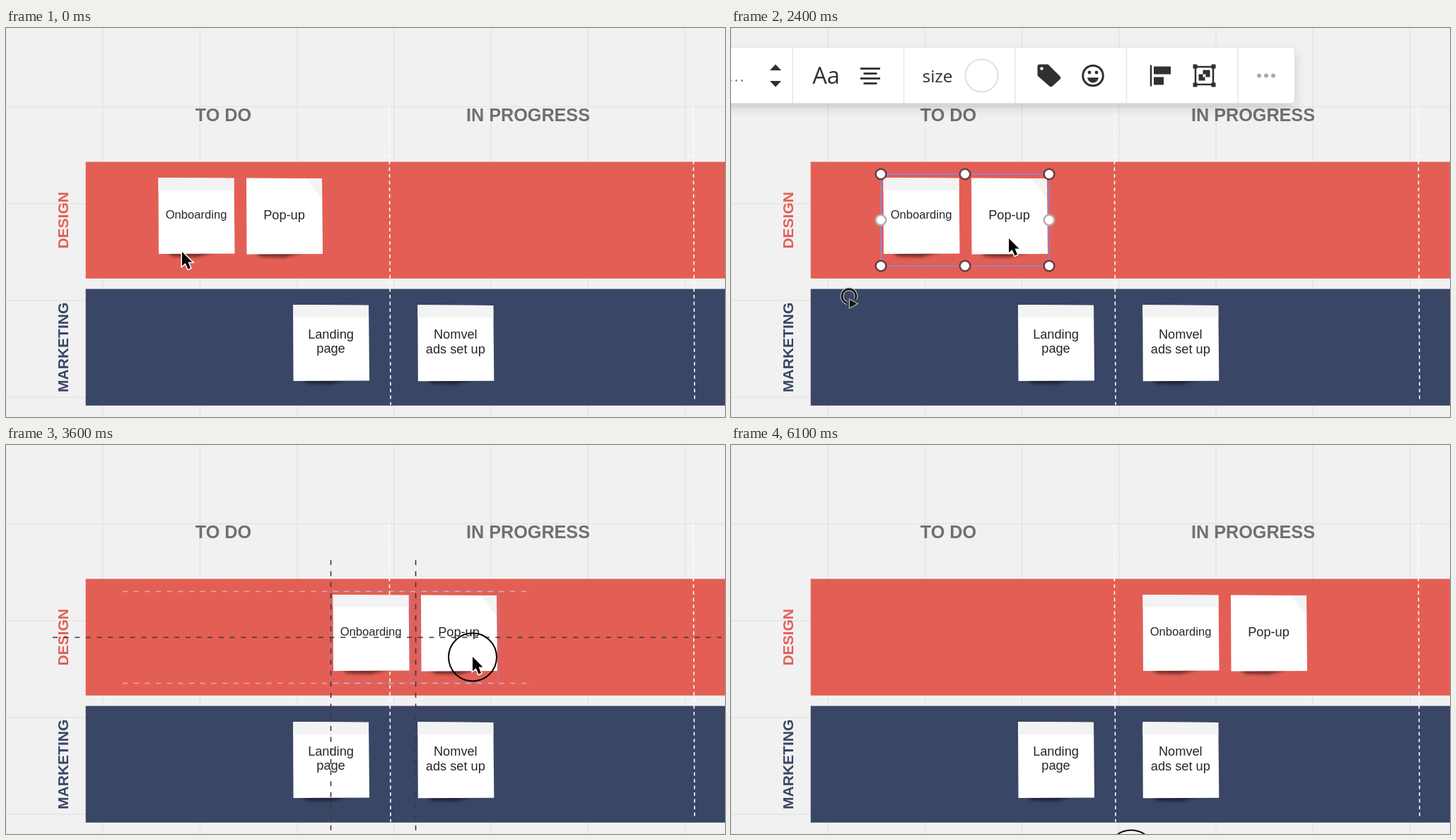
An HTML page with a canvas for the animation above (6200 ms loop, 1017 by 551 pixels).

```html
<!DOCTYPE html>
<html lang="en">
<head>
<meta charset="utf-8">
<title>Task board</title>
<style>
html, body { margin: 0; width: 100%; height: 100%; overflow: hidden; background: #f1f1f1; }
canvas { display: block; }
</style>
</head>
<body>
<canvas id="stage" width="1017" height="551"></canvas>
<script>
const c = document.getElementById('stage').getContext('2d');
const LOOP = 6200, STEP = 100;
const ARIAL = '"Liberation Sans", Arial, sans-serif';
const UI = '"Open Sans", "Noto Sans", sans-serif';
const INK = '#303030', RED = '#e35f55', NAVY = '#3a4665';
const GUIDE_DASH = [7, 8.66];

// Pointer: starting point, then moves as start time, end time, x, y
const START = [249, 317];
const MOVES = [
  [0, 300, 249, 298], [800, 1500, 393, 298], [2900, 3600, 660, 300], [3600, 4000, 766, 300],
  [4400, 5000, 766, 362], [5200, 5900, 566, 579]
];
const PRESSES = [[300, 700], [1500, 1900], [2700, 4300], [6100, LOOP]];
const SINGLE = [700, 1900], DRAG = [2900, 4300], DESELECT = 5200;
const GRAB = 393, DROP = 367, SNAP = 8, LAG = 60;
const BOX = { left: 212, mid: 331, right: 450, top: 207, bottom: 337, card: 113 };
const EDGES = [BOX.left, BOX.mid, BOX.right];
// Alignment guides: x, top, bottom
const GUIDES = [[541, 64, 551], [459, 163, 546], [579, 163, 546]];

const within = (t, [a, b]) => t >= a && t < b;

function pointer(t) {
  return MOVES.reduce(([x, y], [t0, t1, toX, toY]) => {
    const k = Math.min(1, Math.max(0, (t - t0) / (t1 - t0)));
    return [x + (toX - x) * k, y + (toY - y) * k];
  }, START);
}

// The cards trail the pointer a little and snap to guides
function dragShift(t) {
  if (t < DRAG[0]) return 0;
  if (t >= DRAG[1]) return DROP;
  const raw = pointer(t - LAG)[0] - GRAB;
  for (const [x] of GUIDES)
    for (const edge of EDGES)
      if (Math.abs(x - edge - raw) <= SNAP) return x - edge;
  return raw;
}

function line(x0, y0, x1, y1, color, width = 1.5, dash = []) {
  c.strokeStyle = color;
  c.lineWidth = width;
  c.setLineDash(dash);
  c.beginPath();
  c.moveTo(x0, y0);
  c.lineTo(x1, y1);
  c.stroke();
  c.setLineDash([]);
}

function disc(x, y, r, fill, stroke, width = 2) {
  c.beginPath();
  c.arc(x, y, r, 0, 7);
  if (fill) { c.fillStyle = fill; c.fill(); }
  if (stroke) { c.strokeStyle = stroke; c.lineWidth = width; c.stroke(); }
}

function poly(points, fill) {
  c.fillStyle = fill;
  c.beginPath();
  points.forEach(([x, y]) => c.lineTo(x, y));
  c.fill();
}

function rect(x, y, w, h, fill) {
  c.fillStyle = fill;
  c.fillRect(x, y, w, h);
}

function frame(x, y, w, h, color, width) {
  c.strokeStyle = color;
  c.lineWidth = width;
  c.strokeRect(x, y, w, h);
}

function text(s, x, y, font, color) {
  c.font = font;
  c.fillStyle = color;
  c.textAlign = 'center';
  c.fillText(s, x, y);
}

// Runs paint with the origin moved to x, y
function at(x, y, paint) {
  c.save();
  c.translate(x, y);
  paint();
  c.restore();
}

function lane(name, y, color) {
  rect(112.7, y, 905, 165.2, color);
  at(88, y + 82.7, () => {
    c.rotate(-Math.PI / 2);
    text(name, 0, 0, 'bold 21px ' + ARIAL, color);
  });
}

function board() {
  rect(0, 0, 1017, 551, '#f1f1f1');
  for (let i = 0; i < 8; i++) {
    const p = i * 137.2;
    line(p, 0, p, 551, '#e4e4e4');
    line(0, 111.5 + p, 1017, 111.5 + p, '#e4e4e4');
  }
  text('TO DO', 307.5, 132, 'bold 25.2px ' + ARIAL, '#707070');
  text('IN PROGRESS', 738.5, 132, 'bold 25.2px ' + ARIAL, '#707070');
  lane('DESIGN', 189.6, RED);
  lane('MARKETING', 369.6, NAVY);
  line(542, 112, 544, 534, '#fff', 1.6, [5, 4.5]);
  line(972, 112, 974, 526, '#fff', 1.6, [5, 4.5]);
}

function card(x, y, lines, size = 18.2, folded = false) {
  const w = 107, h = 107.5;
  at(x, y, () => {
    c.filter = 'blur(2px)';
    poly([[8, h - 6], [w - 12, h - 6], [w / 2, h + 5], [20, h + 4]], 'rgba(0,0,0,.5)');
    c.filter = 'none';
    poly([[0, 0], [w, .7], [w + 1, h], [.5, h + .5]], '#fff');
    poly(folded ? [[w - 22, 1], [w, 1], [w, 30]] : [[0, 0], [w, .7], [w, 18], [0, 18]], '#f3f3f3');
    lines.forEach((s, i) =>
      text(s, w / 2, 58 + 20.5 * (i - (lines.length - 1) / 2), size + 'px ' + ARIAL, '#262626'));
  });
}

function cards(dx) {
  card(215.5 + dx, 212, ['Onboarding'], 16.6);
  card(340 + dx, 212.5, ['Pop-up'], 18.2, true);
  card(406, 392, ['Landing', 'page']);
  card(582.3, 392.3, ['Nomvel', 'ads set up']);
}

const TAG = new Path2D('M-16-13q0-3 3-3H-1L16 1q1.5 2 0 4L5 15q-2 1.5-4 0L-16 0Z');
const LINK = new Path2D('M-3-7H-8A7 7 0 0 0-8 7H-3M3-7H8A7 7 0 0 1 8 7H3M-6 0H6');
const ARROW = new Path2D('M0 0V20L4.7 16 8.5 24.5 12 23 8.5 14.5H14.5Z');
const TURN = new Path2D('M9 2A10 10 0 1 0-3 7.5');
const TURN_HEAD = new Path2D('M1 3 11 8.5 1 14Z');

const dots = (gap, y, r, color) => [-gap, 0, gap].forEach(x => disc(x, y, r, color));
const chevron = dir => poly([[-8, dir * 7.5], [0, dir * 16], [8, dir * 7.5]], INK);

// Toolbar icons, each drawn around its own centre
const icons = {
  note() {
    const g = c.createLinearGradient(0, -14, 0, 14);
    g.addColorStop(0, '#666');
    g.addColorStop(1, '#383838');
    rect(-14, -14, 28, 28, g);
    poly([[5, 14], [14, 5], [14, 14]], '#fff');
    poly([[5, 14], [5, 5], [14, 5]], '#aaa');
  },
  number() { text('29', 0, 8, '22.5px ' + UI, '#666'); },
  mixed() { dots(8, 7, 1.4, '#888'); },
  steps() { chevron(-1); chevron(1); },
  type() { text('Aa', 0, 11, '32.5px ' + UI, INK); },
  align() {
    for (let i = 0; i < 4; i++) {
      const w = i % 2 ? 9.5 : 14, y = -10 + i * 7;
      line(-w, y, w, y, INK, 2.8);
    }
  },
  link() { c.strokeStyle = INK; c.lineWidth = 3; c.stroke(LINK); },
  size() { text('size', 0, 9.5, '24.5px ' + UI, INK); },
  ring() { disc(0, 0, 23, '#fff', '#e0e0e0'); },
  tag() {
    c.fillStyle = INK;
    c.fill(TAG);
    disc(-10, -10, 2.3, '#fff');
  },
  smile() {
    disc(0, 0, 14.3, null, INK, 3);
    for (const x of [-5, 5]) disc(x, -4.5, 2.4, INK);
    c.beginPath();
    c.arc(0, 2, 8, 0.1, Math.PI - 0.1);
    c.fill();
  },
  edges() {
    line(-13, -15, -13, 15, INK, 2.5);
    rect(-9, -13, 24, 11, INK);
    rect(-9, 2, 14, 11, INK);
  },
  group() {
    frame(-12.5, -12.5, 25, 25, INK, 2.5);
    for (const x of [-13, 13]) for (const y of [-13, 13]) rect(x - 3, y - 3, 6, 6, INK);
    rect(-2, -8, 10, 10, INK);
    rect(-8, -2, 9, 9, INK);
    rect(-2, -2, 4, 4, '#fff');
  },
  more() { dots(10, 0, 3, '#aaa'); }
};

const ONE = ['note', 'number steps', 'type align link', 'size ring', 'tag smile', 'more'];
const MANY = ['note', 'mixed steps', 'type align', 'size ring', 'tag smile', 'edges group', 'more'];

// Splits the bar into groups with icon offsets
function layout(groups) {
  return groups.map(g => {
    const names = g.split(' ');
    if (g === 'more') return { names, first: 40, gap: 0, width: 80 };
    const tight = names[1] === 'steps';
    return { names, first: 47.5, gap: tight ? 55.5 : 62.5, width: tight ? 127 : 32.5 + 62.5 * names.length };
  });
}

function toolbar(x, items) {
  const groups = layout(items);
  c.save();
  c.shadowColor = 'rgba(0,0,0,.16)';
  c.shadowBlur = 16;
  c.shadowOffsetY = 6;
  c.fillStyle = '#fff';
  c.beginPath();
  c.roundRect(x, 28, groups.reduce((sum, g) => sum + g.width, 0), 78.5, 5);
  c.fill();
  c.restore();
  groups.forEach(({ names, first, gap, width }, n) => {
    if (n) line(x, 28, x, 106.5, '#e6e6e6');
    names.forEach((name, i) => at(x + first + gap * i, 67.5, icons[name]));
    x += width;
  });
}

function turnIcon() {
  c.strokeStyle = '#b4b4b4';
  c.lineWidth = 5;
  c.stroke(TURN);
  c.lineWidth = 2.5;
  c.stroke(TURN_HEAD);
  c.strokeStyle = c.fillStyle = '#111';
  c.stroke(TURN);
  c.fill(TURN_HEAD);
}

function selection(left, right, many) {
  const { top, bottom } = BOX, mid = (left + right) / 2, middle = 272;
  const handle = (x, y, color = 'rgba(80,38,42,.8)') => disc(x, y, 7.3, '#fff', color, 2.6);
  frame(left, top, right - left, bottom - top, '#8f86d0', 1.8);
  for (const x of many ? [left, mid, right] : [left, right]) {
    handle(x, top);
    handle(x, bottom);
    if (x !== mid) handle(x, middle, '#b8aeae');
  }
  if (many) {
    at(left - 45, 382, turnIcon);
  } else {
    for (const [x, y] of [[mid, top - 50], [left - 50, middle], [right + 50, middle], [mid, bottom + 50]])
      disc(x, y, 4.5, 'rgba(95,155,255,.4)', 'rgba(255,255,255,.3)', 1);
  }
}

function dragMarks(dx) {
  const { left, right, top, bottom, card } = BOX;
  const dark = '#3c3638';
  for (const x of [left, right - card]) frame(x + dx, top, card, bottom - top, 'rgba(150,135,210,.6)', 1.2);
  for (const y of [top, bottom])
    line(165, y + .5, right + dx + 48, y + .5, 'rgba(255,255,255,.45)', 1.5, GUIDE_DASH);
  line(66, 272.5, 1012, 272.5, dark, 1.5, GUIDE_DASH);
  for (const [x, y0, y1] of GUIDES)
    if (EDGES.some(e => Math.abs(e + dx - x) <= 1))
      line(x + .5, y0, x + .5, y1, dark, 1.6, GUIDE_DASH);
}

function cursor() {
  c.strokeStyle = '#fff';
  c.lineWidth = 3;
  c.stroke(ARROW);
  c.fillStyle = '#000';
  c.fill(ARROW);
}

function draw(t) {
  const dx = dragShift(t), [x, y] = pointer(t);
  board();
  cards(dx);
  if (within(t, DRAG)) dragMarks(dx);
  if (within(t, SINGLE)) {
    selection(BOX.left, BOX.left + BOX.card, false);
    toolbar(-114, ONE);
  }
  if (within(t, [SINGLE[1], DRAG[0]]) || within(t, [DRAG[1], DESELECT])) {
    selection(BOX.left + dx, BOX.right + dx, true);
    toolbar(-135 + dx, MANY);
  }
  if (PRESSES.some(p => within(t, p))) disc(x, y + .5, 34, null, '#000', 2);
  at(x, y, cursor);
}

function tick(now) {
  draw(Math.floor(now % LOOP / STEP) * STEP);
  requestAnimationFrame(tick);
}
draw(0);
requestAnimationFrame(tick);
</script>
</body>
</html>
```
